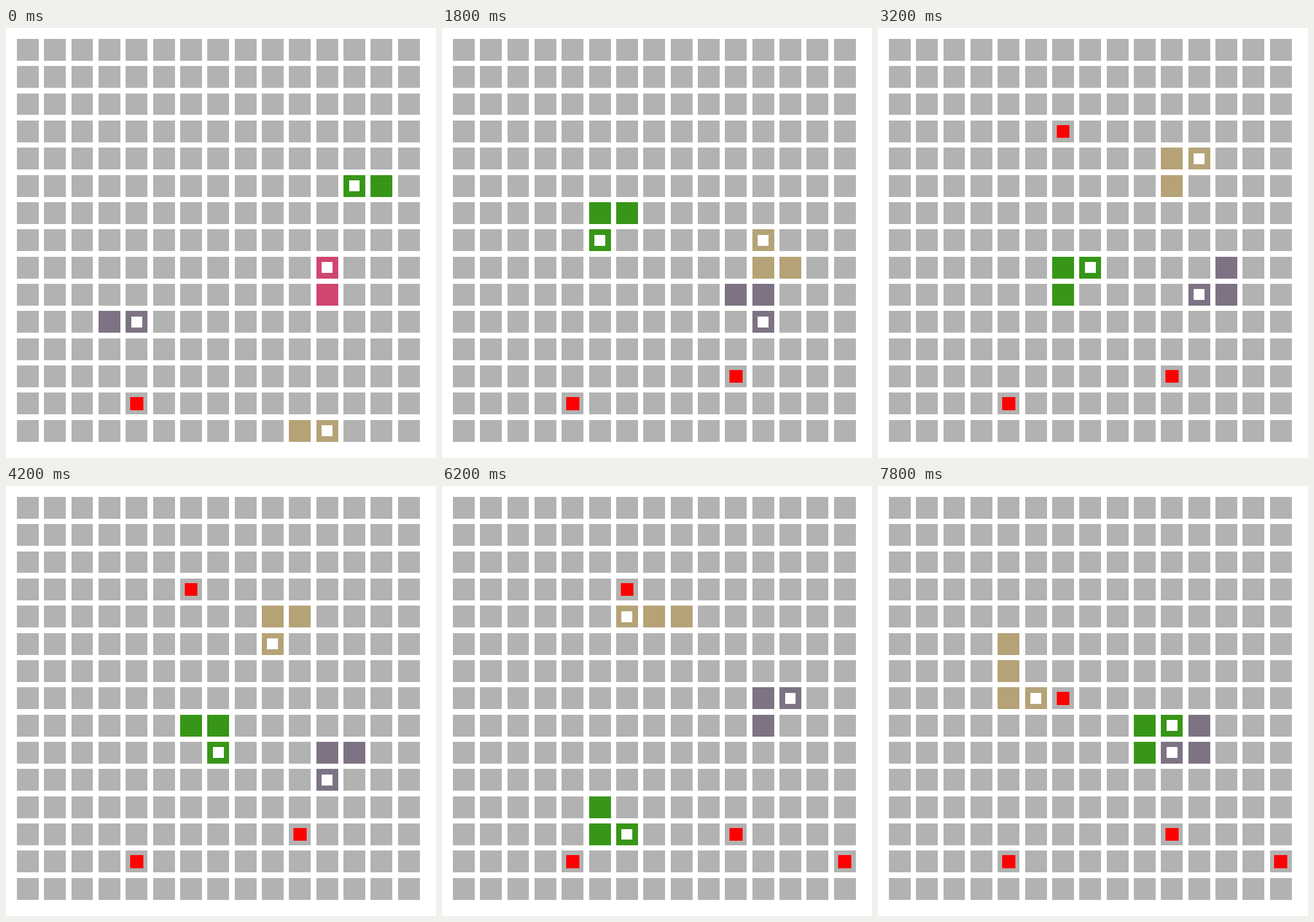
Animation, 748 px wide and 748 px high, one loop 8000 ms. Source, as an HTML page:

```html
<!DOCTYPE html>
<html lang="en">
<head>
<meta charset="utf-8">
<title>Snakes</title>
<style>
  html, body { margin: 0; width: 100%; height: 100%; overflow: hidden; background: #fff; }
  svg { display: block; width: 100%; height: 100%; shape-rendering: crispEdges; }
</style>
</head>
<body>
<svg viewBox="0 0 748 748"><g id="grid"></g><g id="play"></g></svg>
<script>
const COUNT = 15, STEP_MS = 200, STEPS = 40;
const PITCH = 748 / (COUNT + 0.8), CELL = PITCH * 0.8;
const MOVES = { L: [-1, 0], R: [1, 0], U: [0, -1], D: [0, 1] };

// Each route starts at the tail; its first move leads to the opening head.
const snakes = [
  { color: '#379617', start: [13, 5],
    route: 'L LLLDLLL LD RRDDLUR ULDRD LULDL DRDDR URURRUUR' },
  { color: '#cf466f', start: [11, 9], end: 4,
    route: 'U ULU' },
  { color: '#7d7384', start: [3, 10],
    route: 'R RRRURRR RD RULURDL DRULD LULUR DRUUR ULDRDLDL' },
  { color: '#b5a377', start: [10, 14], grow: 32,
    route: 'R URUUUUU LU ULLURUR ULDLD RURUL LDLLL ULLDDDDR' }
];

const foods = [
  { at: [4, 13], from: 0 },
  { at: [10, 12], from: 3 },
  { at: [6, 3], from: 11, to: 32 },
  { at: [14, 13], from: 23 },
  { at: [6, 7], from: 35 }
];

for (const s of snakes) {
  s.cells = [s.start];
  for (const m of s.route.replaceAll(' ', '')) {
    const [x, y] = s.cells.at(-1), [dx, dy] = MOVES[m];
    s.cells.push([x + dx, y + dy]);
  }
}

// Square centred in a cell, snapped to whole pixels.
function square([col, row], scale, fill) {
  const half = CELL * scale / 2;
  const edges = n => {
    const mid = (n + 0.8) * PITCH, lo = Math.round(mid - half);
    return [lo, Math.round(mid + half) - lo];
  };
  const [x, w] = edges(col), [y, h] = edges(row);
  return `<rect x="${x}" y="${y}" width="${w}" height="${h}" fill="${fill}"/>`;
}

function drawSnake({ cells, color, end = STEPS, grow = STEPS }, step) {
  if (step >= end) return '';
  const head = step + 1, length = step < grow ? 3 : 4;
  const body = cells.slice(Math.max(0, head - length + 1), head + 1);
  return body.map(c => square(c, 1, color)).join('') + square(cells[head], 0.5, '#fff');
}

function drawFood({ at, from, to = STEPS }, step) {
  return step >= from && step < to ? square(at, 0.6, '#f00') : '';
}

const play = document.getElementById('play');
let shown = -1;

function render(ms) {
  const step = Math.floor(ms / STEP_MS) % STEPS;
  if (step === shown) return;
  shown = step;
  play.innerHTML = foods.map(f => drawFood(f, step)).join('') +
    snakes.map(s => drawSnake(s, step)).join('');
}

document.getElementById('grid').innerHTML = Array.from({ length: COUNT * COUNT }, (_, i) =>
  square([i % COUNT, Math.floor(i / COUNT)], 1, '#b2b2b2')).join('');

const begin = performance.now();
function tick() {
  render(performance.now() - begin);
  requestAnimationFrame(tick);
}
tick();
</script>
</body>
</html>
```
